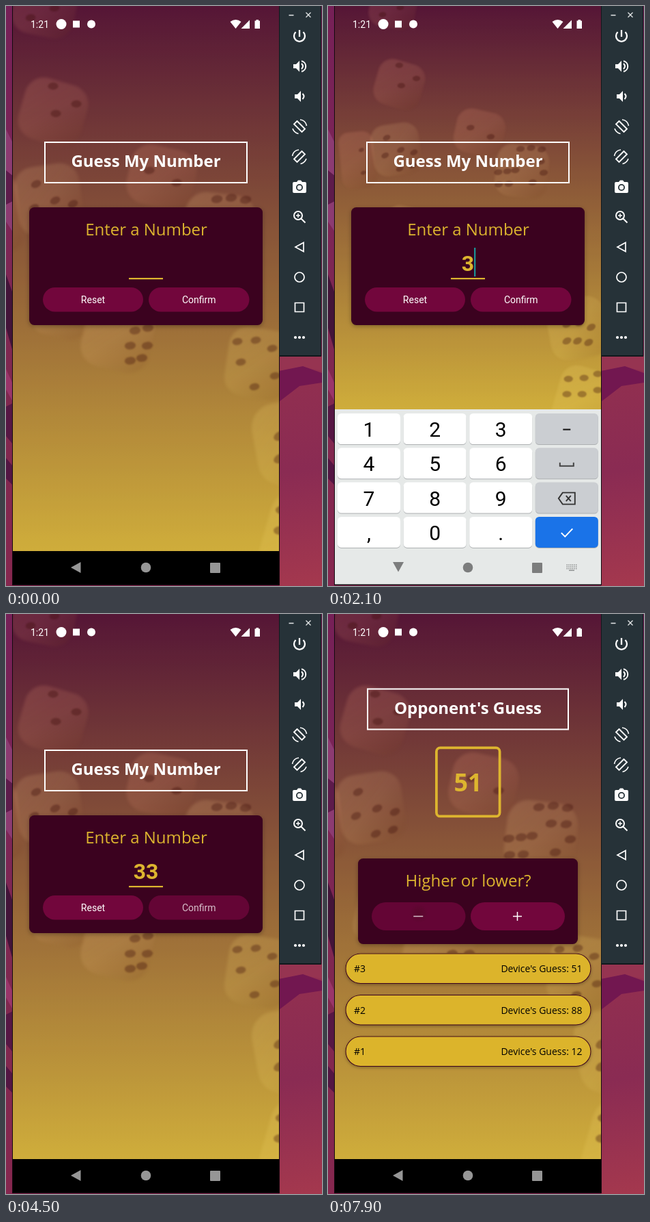
Write an HTML page with a canvas that moves like this. It is 463 px wide and 847 px high and loops after 8 s.

```html
<!DOCTYPE html>
<html lang="en">
<head>
<meta charset="utf-8">
<title>Guess My Number</title>
<style>
html, body { margin: 0; width: 100%; height: 100%; overflow: hidden; background: #7b2453; }
canvas { display: block; width: 463px; height: 847px; }
</style>
</head>
<body>
<canvas id="stage"></canvas>
<script>
const W = 463, H = 847, LOOP = 8000, STEP = 100;
const GOLD = '#ddb52f', WINE = '#3b021f', ROSE = '#72063c';
const SANS = '"Open Sans", sans-serif', ROBOTO = 'Roboto, sans-serif';
const canvas = document.getElementById('stage');
const dpr = window.devicePixelRatio || 1;
canvas.width = W * dpr;
canvas.height = H * dpr;
let ctx = canvas.getContext('2d');

const clamp = v => Math.max(0, Math.min(1, v));
const span = (t, a, b) => clamp((t - a) / (b - a));
const easeOut = p => 1 - (1 - p) ** 3;

function rect(x, y, w, h, fill) {
  ctx.fillStyle = fill;
  ctx.fillRect(x, y, w, h);
}
function round(x, y, w, h, r) {
  ctx.beginPath();
  ctx.roundRect(x, y, w, h, r);
}
function pill(x, y, w, h, r, fill) {
  round(x, y, w, h, r);
  ctx.fillStyle = fill;
  ctx.fill();
}
function dot(x, y, r, fill) {
  ctx.beginPath();
  ctx.arc(x, y, r, 0, Math.PI * 2);
  ctx.fillStyle = fill;
  ctx.fill();
}
function poly(points, fill) {
  ctx.beginPath();
  points.forEach(([x, y]) => ctx.lineTo(x, y));
  ctx.closePath();
  ctx.fillStyle = fill;
  ctx.fill();
}
function line(path, color, width) {
  ctx.strokeStyle = color;
  ctx.lineWidth = width;
  ctx.stroke(new Path2D(path));
}
function shape(path, fill) {
  ctx.fillStyle = fill;
  ctx.fill(new Path2D(path));
}
function text(str, x, y, font, color, align = 'center') {
  ctx.font = font;
  ctx.fillStyle = color;
  ctx.textAlign = align;
  ctx.fillText(str, x, y);
}
function at(x, y, draw) {
  ctx.save();
  ctx.translate(x, y);
  draw();
  ctx.restore();
}
function ramp(x0, y0, x1, y1, ...colors) {
  const g = ctx.createLinearGradient(x0, y0, x1, y1);
  colors.forEach((c, i) => g.addColorStop(i / (colors.length - 1), c));
  return g;
}
function shadow(blur, dy, color) {
  ctx.shadowColor = color;
  ctx.shadowBlur = blur * dpr;
  ctx.shadowOffsetY = dy * dpr;
}

// Soft dice backdrop, painted once on its own layer
const PAD = 70;
const dice = document.createElement('canvas');
dice.width = 560;
dice.height = 900;

function die(x, y, w, h, turn, light, pips) {
  at(x, y, () => {
    ctx.filter = 'blur(2px)';
    ctx.save();
    ctx.rotate(turn);
    pill(-w / 2, -h / 2, w, h, w * .3,
      ramp(-w / 2, -h / 2, w / 2, h / 2, `rgba(${light},.17)`, `rgba(${light},.12)`, 'rgba(90,35,10,.12)'));
    ctx.restore();
    ctx.filter = 'blur(1px)';
    pips.forEach(([px, py]) => {
      ctx.beginPath();
      ctx.ellipse(px, py, w * .08, w * .055, turn - .3, 0, 7);
      ctx.fillStyle = 'rgba(60,12,10,.34)';
      ctx.fill();
    });
  });
}
function paintDice() {
  const main = ctx;
  ctx = dice.getContext('2d');
  ctx.translate(PAD, 0);
  const warm = '255,165,130', pale = '255,205,140', gold = '255,226,120';
  die(56, 5, 92, 78, .2, warm, [[15, -2], [-20, 12]]);
  die(69, 155, 95, 92, .28, warm, [[4, 2], [34, -12], [0, -38]]);
  die(-14, 304, 68, 112, -.1, warm, [[8, -20], [12, 25]]);
  die(63, 283, 96, 102, -.15, pale, [[-19, -23], [-22, 12], [9, 1], [35, 6], [7, 38], [32, 32]]);
  die(228, 250, 98, 88, .22, warm, [[-18, -10], [22, 8]]);
  die(312, 326, 104, 104, .12, pale,
    [[-47, 2], [-29, 0], [-13, -2], [-46, 26], [-26, 25], [-3, -44], [18, -46], [39, -43], [15, -20], [37, -19], [43, 3], [21, 22]]);
  die(82, 440, 84, 88, .2, pale, []);
  die(164, 482, 102, 100, .22, pale, [[18, 14], [43, 14], [18, 36], [44, -12], [25, -8], [35, 32]]);
  die(370, 522, 94, 102, .15, gold, [[-31, -32], [-26, -2], [-6, 34], [20, -22], [24, 18], [-4, -34]]);
  die(422, 636, 116, 120, -.18, gold, [[-21, -8], [4, -11], [27, -2], [-21, 25], [0, 25], [22, 28]]);
  die(434, 778, 112, 128, .28, gold, [[-30, -42], [1, -44], [28, -52], [-33, -12], [-3, -12], [28, -20]]);
  ctx = main;
}

function desktop() {
  rect(0, 0, W, H, ramp(0, 0, 0, H, '#762057', '#7c2557', '#80284f', '#86274f'));
  poly([[0, 180], [10, 200], [10, 330], [0, 315]], '#8c3b72');
  poly([[0, 240], [10, 248], [10, 285], [0, 290]], '#5d1b4b');
  poly([[0, 392], [10, 420], [10, 505], [0, 470]], '#431439');
  poly([[0, 530], [10, 552], [10, 578], [0, 560]], '#9a356a');
  poly([[0, 585], [10, 580], [10, 640], [0, 628]], '#561744');
  poly([[0, 660], [10, 672], [10, 700], [0, 690]], '#531643');
  rect(400, 511, 63, 336, ramp(400, 511, 445, 847, '#93304f', '#8a2b53', '#a4384e'));
  poly([[400, 511], [463, 511], [463, 533], [435, 527], [400, 533]], '#963451');
  poly([[400, 533], [435, 526], [463, 536], [463, 550], [430, 555], [400, 578]], '#721750');
}

const TOOLS = [
  () => line('M0-9V1M-5.5-6A8 8 0 1 0 5.5-6', '#fff', 2.3),
  () => { speaker(-9); line('M3-4Q7 0 3 4M3-7.8A8 8 0 0 1 3 7.8', '#fff', 2); },
  () => { speaker(-7); line('M4.5-4Q8.5 0 4.5 4', '#fff', 2); },
  () => turned(1),
  () => turned(-1),
  () => {
    shape('M-8-7H-4L-2-9.5H2L4-7H8Q10-7 10-5V7Q10 9 8 9H-8Q-10 9-10 7V-5Q-10-7-8-7Z', '#fff');
    dot(0, 1, 5, '#263238');
    dot(0, 1, 3.2, '#fff');
  },
  () => {
    line('M4-2A6 6 0 1 1-8-2A6 6 0 1 1 4-2M2.5 2.5L8.5 8.5', '#fff', 2);
    line('M-5-2H1M-2-5V1', '#fff', 1.5);
  },
  () => line('M6-6.5V6.5L-6 0Z', '#fff', 1.7),
  () => line('M7 0A7 7 0 1 1-7 0A7 7 0 1 1 7 0', '#fff', 1.7),
  () => line('M-6.5-6.5H6.5V6.5H-6.5Z', '#fff', 1.7),
  () => [-6, 0, 6].forEach(x => dot(x, 0, 2.1, '#fff'))
];
function speaker(x) {
  at(x, 0, () => shape('M0-3H4L9-8V8L4 3H0Z', '#fff'));
}
function turned(dir) {
  ctx.scale(dir, 1);
  line('M-3.5-8L8 3.5L3.5 8L-8-3.5Z', '#fff', 1.9);
  line('M1-10Q9-9 10.5-1M-1.5 10.5Q-8 9-10 3', '#fff', 1.6);
}
function toolbar() {
  rect(400, 0, 62, 512, '#11191c');
  rect(401, 0, 60, 510, '#263238');
  line('M414.5 13.5H421.5M439.5 9.5L446.5 16.5M446.5 9.5L439.5 16.5', '#e5e8e9', 1.3);
  TOOLS.forEach((draw, i) => at(430, 44 + i * 44, draw));
}

function backdrop(h) {
  rect(10, 0, 390, h, ramp(0, 0, 0, h, '#4e0329', GOLD));
  rect(10, 0, 390, h, 'rgba(128,130,125,.15)');
  const k = h / 796;
  ctx.save();
  ctx.beginPath();
  ctx.rect(10, 0, 390, h);
  ctx.clip();
  ctx.drawImage(dice, 205 - (205 + PAD) * k, 0, dice.width * k, dice.height * k);
  ctx.restore();
}
function status() {
  text('1:21', 36, 31.5, '14px ' + ROBOTO, '#fff', 'left');
  dot(81, 26.5, 7.5, '#fff');
  rect(98, 21.5, 10, 10, '#fff');
  dot(125, 26.5, 6, '#fff');
  shape('M328.5 23Q336.500 17 344.500 23L336.500 33Z', '#fff');
  shape('M357 20.500V33H344.500Z', '#fff');
  shape('M366.500 20H370V21.500H372V33H364.500V21.500H366.500Z', '#fff');
}

function heading(str, x, y, w) {
  ctx.strokeStyle = '#fff';
  ctx.lineWidth = 2;
  ctx.strokeRect(x, y, w, 59);
  text(str, 205, y + 36.3, 'bold 24px ' + SANS, '#fff');
}
function card(x, y, w, h, title, base) {
  ctx.save();
  shadow(6, 2, 'rgba(0,0,0,.3)');
  pill(x, y, w, h, 7.5, WINE);
  ctx.restore();
  text(title, 205.500, base, '24px ' + SANS, GOLD);
}
function button(x, y, w, h, pressed, label, wave) {
  ctx.save();
  if (pressed) ctx.globalAlpha = .75;
  pill(x, y, w, h, h / 2, ROSE);
  if (wave) {
    const cx = x + w / 2, cy = y + h / 2 - 4;
    const g = ctx.createRadialGradient(cx, cy, 0, cx, cy, wave.r);
    g.addColorStop(0, `rgba(58,14,20,${wave.a})`);
    g.addColorStop(1, 'rgba(58,14,20,0)');
    ctx.fillStyle = g;
    ctx.fill();
  }
  const cx = x + w / 2, cy = y + h / 2;
  if (label === '+' || label === '-') {
    at(cx - .5, cy, () => line(label === '+' ? 'M-6.5 0H6.5M0-6.5V6.5' : 'M-7 0H7', '#fff', 1.5));
  } else {
    text(label, cx, cy + 5.5, '14px ' + ROBOTO, '#fff');
  }
  ctx.restore();
}
function wave(t, down, end) {
  if (t < down || t >= end) return null;
  const p = (t - down) / (end - down);
  return { r: 14 + 34 * easeOut(span(t, down, down + 300)), a: .75 * (1 - p) };
}

function startScreen(t) {
  heading('Guess My Number', 57, 199, 296);
  card(34, 294, 342, 172, 'Enter a Number', 335);
  const typed = t < 2100 ? '' : t < 2300 ? '3' : '33';
  text(typed, 205, 387, 'bold 32px ' + ROBOTO, GOLD);
  rect(180, 397, 50, 2.2, GOLD);
  const blink = t < 900 || (t < 2300 ? t < 1400 || t >= 1900 : t < 2800);
  if (t >= 300 && t < 3300 && blink) {
    rect(205 + typed.length * 9.2, 353, 2, 42, '#17a2a4');
  }
  button(54, 411, 147, 35.500, false, 'Reset');
  button(209, 411, 147.500, 35.500, t >= 4500, 'Confirm');
}

function gameScreen(t) {
  const guesses = t < 5900 ? [12] : t < 6500 ? [88, 12] : [51, 88, 12];
  heading("Opponent's Guess", 58, 109.500, 294);
  round(158.900, 195.400, 92.700, 100, 5.500);
  ctx.strokeStyle = GOLD;
  ctx.lineWidth = 3.8;
  ctx.stroke();
  text(guesses[0], 205, 259, 'bold 36px ' + SANS, GOLD);
  card(44, 357, 322, 125, 'Higher or lower?', 398);
  const minusDown = (t >= 6300 && t < 6500) || t >= 7900;
  const minusWave = t >= 7900 ? { r: 14, a: .4 } : wave(t, 6300, 7300);
  button(64, 421, 137.500, 41, minusDown, '-', minusWave);
  button(209, 421, 138, 41, t >= 5700 && t < 5900, '+', wave(t, 5800, 6400));
  guesses.forEach((g, i) => {
    const y = 496 + i * 60.500;
    ctx.save();
    shadow(4, 2, 'rgba(0,0,0,.3)');
    pill(25.500, y - .5, 360, 44, 22, '#dcb42b');
    ctx.restore();
    round(26, y, 359, 43.500, 21.700);
    ctx.strokeStyle = WINE;
    ctx.lineWidth = 1.1;
    ctx.stroke();
    text('#' + (guesses.length - i), 38, y + 27, '14px ' + SANS, '#000', 'left');
    text("Device's Guess: " + g, 372.500, y + 27, '14px ' + SANS, '#000', 'right');
  });
}

const KEYS = ['123-', '456_', '789<', ',0.!'];
const MARKS = {
  '-': () => line('M-5.500 1H5.500', '#111', 2),
  '_': () => line('M-10-1V4H10V-1', '#444', 2),
  '<': () => line('M-12 1L-6-7.500H12V9.500H-6ZM-1-3L6 5M6-3L-1 5', '#333', 1.9),
  '!': () => line('M-8 1L-2.500 6.500L8.500-5', '#fff', 2)
};
function keyboard(top) {
  at(0, top - 589, () => {
    rect(10, 589, 390, 256, '#e6e9e8');
    KEYS.forEach((row, r) => [...row].forEach((k, c) => {
      const x = 14 + c * 96.600, y = 595 + r * 50.300;
      const fill = k === '!' ? '#1a73e8' : c === 3 ? '#cbced2' : '#fff';
      pill(x, y + 1, 92, 45, 5.500, '#adb0b2');
      pill(x, y, 92, 45, 5.500, fill);
      if (MARKS[k]) at(x + 46, y + 22.500, MARKS[k]);
      else text(k, x + 46, y + 34, '30px ' + ROBOTO, '#000');
    }));
  });
}
function navBar(t, up) {
  const color = up ? '#7c7d7d' : '#969696';
  const turn = easeOut(span(t, 500, 900)) - easeOut(span(t, 3300, 3700));
  at(103, 820, () => {
    if (up) ctx.translate(0, -1.500 * turn);
    ctx.rotate(-turn * Math.PI / 2);
    poly([[-8, 0], [6.500, -8], [6.500, 8]], color);
  });
  dot(205, 820, 7.300, color);
  pill(299, 813, 15, 15, 1, color);
  if (up) {
    for (let i = 0; i < 18; i++) {
      rect(349.500 + (i % 6) * 2.700, 815.500 + Math.floor(i / 6) * 2.700, 1.500, 1.500, '#8b8d8d');
    }
    rect(353, 823.500, 8, 1.400, '#8b8d8d');
  }
}

function draw(t) {
  ctx.setTransform(dpr, 0, 0, dpr, 0, 0);
  desktop();
  rect(9, 0, 392, 846, '#140a10');
  ctx.save();
  ctx.beginPath();
  ctx.rect(10, 0, 390, 844.500);
  ctx.clip();
  backdrop(t >= 600 && t < 3500 ? 589 : 796);
  rect(10, 796, 390, 49, '#000');
  status();
  if (t < 4600) startScreen(t);
  else gameScreen(t);
  const rise = easeOut(span(t, 400, 600)) - span(t, 3400, 3700) ** 2;
  if (rise > 0) keyboard(845 - 256 * rise);
  navBar(t, rise > .2);
  ctx.restore();
  toolbar();
}

function tick() {
  const t = performance.now() % LOOP;
  draw(Math.floor(t / STEP) * STEP);
  requestAnimationFrame(tick);
}
paintDice();
tick();
</script>
</body>
</html>
```
